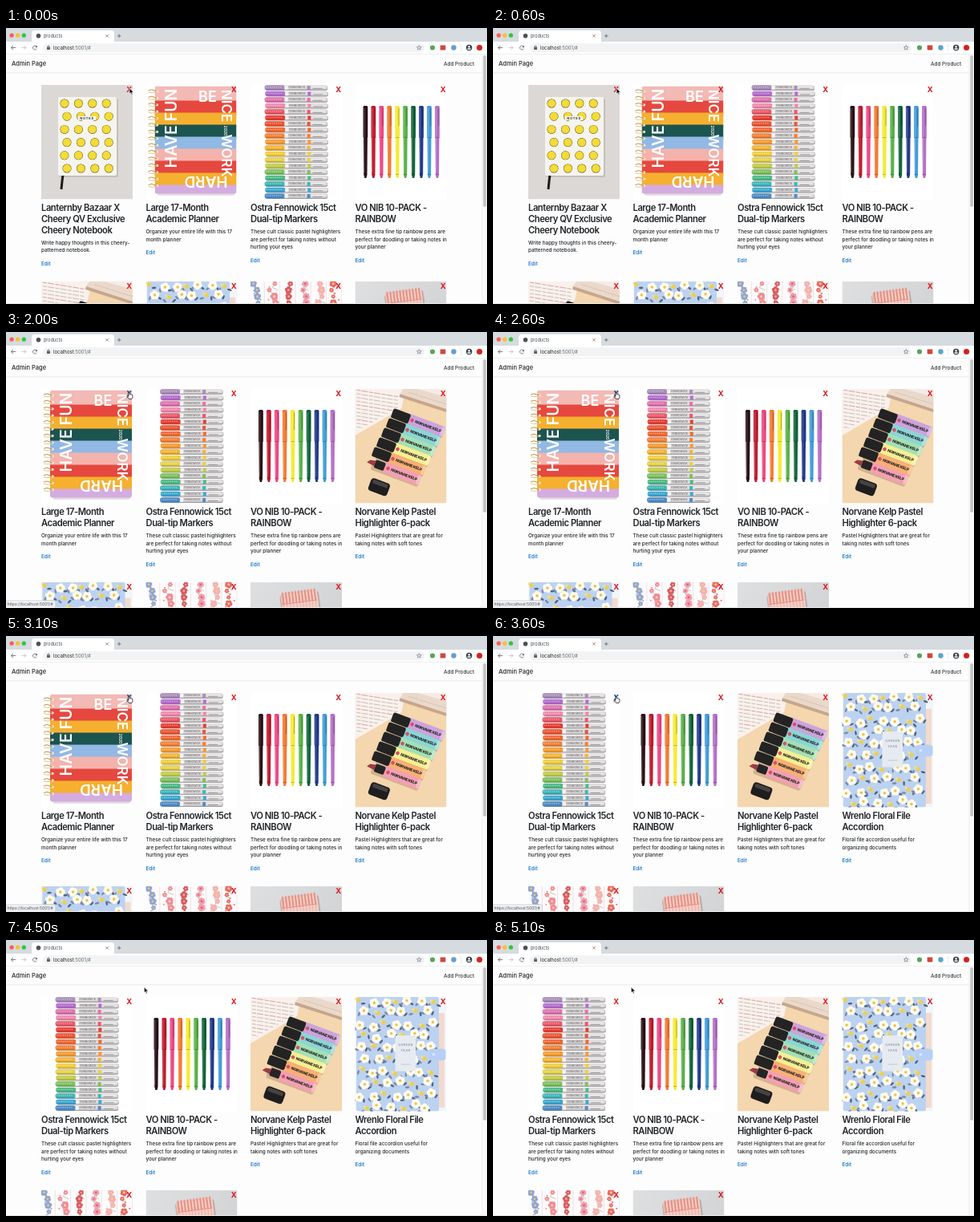
These frames come from a looping animation (600 by 344 pixels, 5.2 s). An HTML page with a canvas:

```html
<!DOCTYPE html>
<html lang="en">
<head>
<meta charset="utf-8">
<title>products</title>
<style>
html, body { margin: 0; width: 100%; height: 100%; overflow: hidden; background: #fff; }
canvas { display: block; width: 600px; height: 344px; }
</style>
</head>
<body>
<canvas id="stage"></canvas>
<script>
const W = 600, H = 344, LOOP = 5200;
const HOVER = 1200, STATUS_ON = 1400, DELETE_1 = 1700, DELETE_2 = 3400;
const LEAVE = 3900, ARRIVE = 4300;
const FONT = 'Inter, "Open Sans", sans-serif';
const stage = document.getElementById('stage');
const dpr = window.devicePixelRatio || 1;
stage.width = W * dpr;
stage.height = H * dpr;
const c = stage.getContext('2d');

function rect(x, y, w, h, fill, r = 0) {
  c.fillStyle = fill;
  c.beginPath();
  c.roundRect(x, y, w, h, r);
  c.fill();
}
function dot(x, y, r, fill) {
  c.fillStyle = fill;
  c.beginPath();
  c.arc(x, y, r, 0, Math.PI * 2);
  c.fill();
}
function line(points, color, width = 1) {
  c.strokeStyle = color;
  c.lineWidth = width;
  c.beginPath();
  points.forEach(([x, y]) => c.lineTo(x, y));
  c.stroke();
}
function arc(x, y, r, from, to, color, width = 0.8) {
  c.strokeStyle = color;
  c.lineWidth = width;
  c.beginPath();
  c.arc(x, y, r, from, to);
  c.stroke();
}
function poly(points, fill, stroke, width = 0.7) {
  c.beginPath();
  points.forEach(([x, y]) => c.lineTo(x, y));
  c.closePath();
  c.fillStyle = fill;
  c.fill();
  if (stroke) {
    c.strokeStyle = stroke;
    c.lineWidth = width;
    c.stroke();
  }
}
function text(s, x, y, size, color, { weight = 400, align = 'left', spacing = 0 } = {}) {
  c.font = `${weight} ${size}px ${FONT}`;
  c.letterSpacing = spacing + 'px';
  c.textAlign = align;
  c.textBaseline = 'alphabetic';
  c.fillStyle = color;
  c.fillText(s, x, y + size * 0.36);
}
function at(x, y, angle, draw) {
  c.save();
  c.translate(x, y);
  c.rotate(angle);
  draw();
  c.restore();
}
function random(seed) {
  return () => (seed = (seed * 16807) % 2147483647) / 2147483647;
}
function flower(x, y, r, petal, heart) {
  for (let k = 0; k < 5; k++) {
    const a = k * Math.PI * 0.4 + x;
    dot(x + Math.cos(a) * r * 0.55, y + Math.sin(a) * r * 0.55, r * 0.52, petal);
  }
  dot(x, y, r * 0.32, heart);
}
function leaf(x, y, angle, color) {
  c.fillStyle = color;
  c.beginPath();
  c.ellipse(x, y, 2.9, 1.3, angle, 0, Math.PI * 2);
  c.fill();
}

// Product pictures, each in a box of 114 by 142.5
function notebook() {
  rect(0, 0, 114, 142.5, '#dcd8d6');
  rect(22, 17, 74, 98, '#c4bfbb', 2);
  line([[27, 112], [26, 120], [25, 130]], '#1d1d1d', 3);
  rect(21, 15, 73, 98, '#f6f4ee', 2);
  for (let row = 0; row < 6; row++) {
    for (let col = 0; col < 4; col++) {
      const x = 29 + col * 17.4 + (row % 2 ? 3 : 0), y = 23 + row * 16.2;
      dot(x, y, 5.5, '#4a4420');
      dot(x, y, 5.1, '#f3dc35');
    }
  }
  rect(46, 39, 22, 5, '#f6f4ee');
  text('NOTES', 57, 41.5, 4, '#333', { weight: 700, align: 'center', spacing: 0.8 });
}

function planner() {
  rect(0, 0, 114, 142.5, '#fff');
  rect(14, 130, 97, 8, '#e2dfdf', 3);
  const stripes = ['#f3b9b5', '#e5483f', '#f5b02f', '#1c5450', '#92b9e4',
    '#f3b3ac', '#e5483f', '#f5b02f', '#d4ace0'];
  c.save();
  c.beginPath();
  c.roundRect(11, 1.5, 102, 134, 3);
  c.clip();
  stripes.forEach((s, i) => rect(11, 1.5 + (i + (i ? 0.2 : 0)) * 15, 102, 18.5, s));
  c.restore();
  for (let y = 8; y < 132; y += 8.4) {
    dot(14, y, 1.6, '#fff4e2');
    line([[3, y - 1], [7, y - 2.2], [14, y]], '#b9923f', 1);
    line([[3, y + 1], [8, y + 1.8], [14, y + 1]], '#d9bc76', 0.8);
  }
  const word = (s, x, y, angle, size) => at(x, y, angle, () =>
    text(s, 0, 0, size, '#fff', { weight: 600, align: 'center' }));
  word('HAVE FUN', 31, 54, -Math.PI / 2, 19.5);
  word('BE', 77, 15, 0, 18);
  word('NICE', 101, 26, Math.PI / 2, 17);
  word('WORK', 101, 88, Math.PI / 2, 17);
  word('HARD', 75, 121, Math.PI, 19);
  word('2020', 99, 57, Math.PI / 2, 5);
}

function markers() {
  rect(0, 0, 114, 142.5, '#fff');
  const inks = ['#a98fbd', '#b56fd0', '#e273b0', '#f08bb0', '#ec5a68', '#e83f35', '#ee5630',
    '#f26a35', '#f58236', '#f49d35', '#f4b535', '#f2cf3e', '#e6d24e', '#c3cc4c',
    '#7cc45c', '#4fbb86', '#43b6b8', '#3fa9d2', '#4f8fc8'];
  inks.forEach((ink, i) => {
    const y = 0.3 + i * 7.5, x = 17.6 + (i % 2) * 0.7;
    rect(x + 1, y + 0.4, 77.5, 6.4, '#a3a0a2', 2.5);
    rect(x + 1, y + 0.5, 77, 4.7, '#dedbdc', 2);
    rect(x, y, 25, 6.2, ink, 2.5);
    line([[x + 2, y + 5.4], [x + 24, y + 5.4]], 'rgba(60,40,60,.28)', 1);
    for (let k = 2; k < 22; k += 2.6) dot(x + k, y + 2.4, 0.65, 'rgba(255,255,255,.5)');
    rect(x + 25, y + 0.8, 4, 4.6, '#f5f3f3');
    text('FENNOWICK', x + 30, y + 2.9, 3.3, '#6f6b6d', { weight: 500 });
    rect(x + 53, y + 0.6, 4, 5, ink);
    line([[x + 58, y + 2.2], [x + 76, y + 2.2]], '#f4f2f2', 1.2);
    line([[x + 60, y + 4], [x + 72, y + 4]], '#8d898b', 0.8);
  });
}

function pens() {
  rect(0, 0, 114, 142.5, '#fff');
  const inks = ['#2a1218', '#c01c30', '#ee4784', '#f47a30', '#f5ea32',
    '#58b147', '#12653b', '#213a8c', '#419cda', '#b56fc6'];
  inks.forEach((ink, i) => {
    const x = 10 + i * 9.95;
    rect(x, 26, 5.8, 40, ink, 1.5);
    poly([[x + 0.4, 65], [x + 5.4, 65], [x + 5, 112], [x + 4, 116], [x + 1.8, 116], [x + 0.8, 112]], ink);
    line([[x + 1.4, 29], [x + 1.4, 109]], 'rgba(255,255,255,.3)', 0.8);
    line([[x + 0.4, 65.5], [x + 5.4, 65.5]], 'rgba(0,0,0,.3)', 0.7);
    line([[x + 4.7, 29], [x + 4.7, 51]], 'rgba(0,0,0,.28)', 1);
    line([[x + 1, 111.5], [x + 4.8, 111.5]], 'rgba(0,0,0,.3)', 0.8);
  });
}

function highlighters() {
  rect(0, 0, 114, 142.5, '#f4d6af');
  poly([[0, 0], [63, 0], [58, 24], [0, 58]], '#f8f1ec');
  for (let i = 0; i < 11; i++) {
    const y = 1 + i * 4.6;
    at(0, y, 0.16, () => {
      c.setLineDash([5, 1.2, 8, 1.5]);
      line([[2, 0], [Math.min(55, 74 - i * 6.5), 0]], i % 4 ? '#cbb9b4' : '#dc9b9d', 0.9);
      c.setLineDash([]);
    });
  }
  poly([[56, 6], [114, 25], [114, 29], [55, 10]], '#c6a68d');
  poly([[60, 0], [114, 0], [114, 25], [56, 6]], '#ead9cb');
  poly([[78, 0], [114, 0], [114, 10]], '#f5ece6');
  line([[66, 4], [114, 19]], '#d3bba9', 0.7);
  const inks = ['#cda3dc', '#8bd5d6', '#a4e0b5', '#f5ef94', '#f7b074', '#f2a0b2'];
  inks.forEach((ink, i) => at(79 - i * 6, 42 + i * 12, 0.36, () => {
    rect(-29, -2, 63, 11, 'rgba(110,70,40,.25)', 3);
    rect(-15, -6.8, 49, 13.6, ink, 3);
    if (i < 5) rect(-35, -6.2, 23, 12.4, '#232323', 2.5);
    else {
      rect(-26, -5.2, 13, 10.4, '#262426', 2);
      poly([[-26, -3.5], [-33, -2], [-36, 2], [-26, 3.5]], '#9c3c45');
    }
    rect(30, -6, 4, 12, 'rgba(255,255,255,.3)', 2);
    dot(-8.5, 0, 2.3, '#d45264');
    text('NORVANE KELP', -4.5, 0, 4.8, '#222', { weight: 800, spacing: -0.25 });
  }));
  at(30, 122, 0.35, () => {
    rect(-12.5, -8, 25, 16.5, '#1e1e1e', 4);
    rect(-10, -6.5, 20, 5, '#444', 2);
  });
}

function binder() {
  const rnd = random(41);
  rect(0, 0, 114, 142.5, '#f2f5f9');
  rect(104, 20, 7.5, 118, '#f2dace', 1);
  rect(1.5, 0, 103, 142.5, '#bcd2f1', 3);
  for (let row = 0; row < 10; row++) {
    for (let col = 0; col < 7; col++) {
      const x = 7 + col * 15 + (row % 2) * 6 + (rnd() - 0.5) * 6;
      const y = 5 + row * 14.6 + (rnd() - 0.5) * 7;
      if (x > 99) continue;
      const turn = rnd() * Math.PI;
      leaf(x + 6, y + 4, turn, '#566480');
      leaf(x - 6, y + 4, turn + 1.5, '#7d8ba6');
      if ((row + col * 2) % 3) flower(x, y, 5.6, '#fdfbf0', '#ecc545');
      else {
        dot(x, y, 2.5, '#f1cf45');
        dot(x - 3.5, y - 2, 1.7, '#f5e07c');
      }
    }
  }
  rect(50, 48, 25.5, 44.5, '#e6ebf1');
  text('GARDEN', 63, 60, 3.8, '#747b87', { align: 'center', spacing: 0.5 });
  text('YEAR', 63, 67, 3.8, '#747b87', { align: 'center', spacing: 0.5 });
  line([[57, 84], [69, 84]], '#aab0bb', 0.6);
  rect(92, 64.5, 21, 14.5, '#b7cff5', 4);
  dot(98, 71.5, 1.8, '#dce7fa');
}

function florals() {
  const rnd = random(97);
  rect(0, 0, 114, 142.5, '#fcfafa');
  const strips = [['#8fa4d6', '#f1cb58'], ['#f08a9c', '#f9d98d'], ['#d95a5f', '#f0b3a4'],
    ['#ef9fae', '#e2606c'], ['#f4b0b4', '#f0d084'], ['#e8696a', '#f7d36a']];
  strips.forEach(([petal, heart], i) => {
    const x = 8 + i * 19.3;
    line([[x + 9.3, 0], [x + 9.3, 142]], '#e4e0df', 0.8);
    for (let y = 3; y < 142; y += 8) {
      const px = x + (rnd() - 0.5) * 9;
      line([[px, y], [x, y + 5], [px + 4, y + 8]], '#a9b59c', 0.7);
      flower(px, y, 2.4 + rnd() * 2.4, petal, heart);
      dot(x + (rnd() - 0.5) * 12, y + 4, 1, petal);
    }
  });
}

function comb() {
  const light = c.createLinearGradient(0, 0, 114, 60);
  light.addColorStop(0, '#dedfe0');
  light.addColorStop(1, '#d2d3d4');
  rect(0, 0, 114, 142.5, light);
  at(61, 22, -0.13, () => {
    rect(-24, -8, 49, 90, '#b7afad', 3);
    rect(-23, -10, 46, 90, '#f2bcb1', 4);
    for (let x = -21; x < 21; x += 4) {
      rect(x, -11.5, 2.3, 14, '#e5968c', 1);
      line([[x + 3, -9], [x + 3, 60]], '#fae1da', 0.9);
    }
    line([[-22, 3], [22, 3]], '#d98078', 0.8);
  });
}

const products = [
  { photo: notebook, title: ['Lanternby Bazaar X', 'Cheery QV Exclusive', 'Cheery Notebook'],
    note: ['Write happy thoughts in this cheery-', 'patterned notebook.'] },
  { photo: planner, title: ['Large 17-Month', 'Academic Planner'],
    note: ['Organize your entire life with this 17', 'month planner'] },
  { photo: markers, title: ['Ostra Fennowick 15ct', 'Dual-tip Markers'],
    note: ['These cult classic pastel highlighters', 'are perfect for taking notes without', 'hurting your eyes'] },
  { photo: pens, title: ['VO NIB 10-PACK -', 'RAINBOW'],
    note: ['These extra fine tip rainbow pens are', 'perfect for doodling or taking notes in', 'your planner'] },
  { photo: highlighters, title: ['Norvane Kelp Pastel', 'Highlighter 6-pack'],
    note: ['Pastel Highlighters that are great for', 'taking notes with soft tones'] },
  { photo: binder, title: ['Wrenlo Floral File', 'Accordion'],
    note: ['Floral file accordion useful for', 'organizing documents'] },
  { photo: florals, title: [], note: [] },
  { photo: comb, title: [], note: [] }
];

const noteOffset = p => 155 + p.title.length * 13.75;
const editOffset = p => noteOffset(p) + p.note.length * 9.8 + 6.8;

function card(p, x, y, hovered) {
  c.save();
  c.translate(x, y);
  c.save();
  c.beginPath();
  c.rect(0, 0, 114, 142.5);
  c.clip();
  p.photo();
  c.restore();
  text('X', 109.7, 5.6, 9.4, hovered ? '#0b4da2' : '#d9151b', { weight: 700, align: 'center' });
  if (hovered) line([[106.3, 10.2], [113, 10.2]], '#0b4da2', 0.8);
  p.title.forEach((s, i) => text(s, 0, 153.4 + i * 13.75, 11.2, '#212529', { weight: 600, spacing: -0.45 }));
  p.note.forEach((s, i) => text(s, 0, noteOffset(p) + i * 9.8, 6.35, '#212529', { weight: 500 }));
  text('Edit', 0, editOffset(p), 6.4, '#0468c8', { weight: 500 });
  c.restore();
}

function page(list, hovering) {
  rect(0, 33, W, H - 33, '#fdfdfd');
  text('Admin Page', 7, 44.3, 7.5, '#212529', { weight: 500 });
  text('Add Product', 546, 44.3, 6.4, '#30343a', { weight: 500 });
  rect(0, 55.4, 594, 0.8, '#dfe1e4');
  const secondRow = 71 + Math.max(...list.slice(0, 4).map(editOffset)) + 22;
  list.forEach((p, i) =>
    card(p, 44 + (i % 4) * 130.5, i < 4 ? 71 : secondRow, hovering && i === 0));
  rect(594, 33, 6, H - 33, '#fafafa');
  rect(593.7, 33, 0.5, H - 33, '#e5e5e5');
  rect(595.3, 34, 3.6, list.length === 8 ? 189 : 191, '#c1c1c1', 1.8);
  rect(0, H - 1, W, 1, '#e4e5e6');
}

function browser() {
  rect(0, 0, W, 17, '#d6dbdf');
  ['#f95f57', '#fcbd2e', '#29c940'].forEach((color, i) => dot(7.1 + i * 7.6, 9.2, 2.6, color));
  rect(32, 3, 103, 15, '#fff', [4, 4, 0, 0]);
  dot(40.5, 9.8, 2.8, '#4b5056');
  text('products', 47, 9.8, 5.5, '#44484d');
  const gray = '#5f6368';
  line([[124.4, 8.1], [127.8, 11.5]], gray, 0.7);
  line([[127.8, 8.1], [124.4, 11.5]], gray, 0.7);
  line([[138.9, 9.8], [143.5, 9.8]], gray, 0.8);
  line([[141.2, 7.5], [141.2, 12.1]], gray, 0.8);

  rect(0, 17, W, 16, '#fff');
  line([[12, 24.5], [6.5, 24.5]], gray, 0.8);
  line([[9, 22], [6.5, 24.5], [9, 27]], gray, 0.8);
  line([[19.5, 24.5], [25, 24.5]], '#b9bcc0', 0.8);
  line([[22.5, 22], [25, 24.5], [22.5, 27]], '#b9bcc0', 0.8);
  arc(36, 24.5, 2.5, 0.5, 5.5, gray);
  poly([[38.8, 21.6], [38.8, 24.3], [36.2, 24.3]], gray);
  rect(46, 19, 476, 11.2, '#f1f3f4', 5.6);
  arc(53, 23.4, 1.3, Math.PI, Math.PI * 2, gray, 0.7);
  rect(51, 23.6, 4, 3.4, gray, 0.5);
  text('localhost', 59, 24.6, 6, '#25282c');
  text(':5001/#', 59 + c.measureText('localhost').width, 24.6, 6, '#6a6e73');
  const star = Array.from({ length: 10 }, (_, k) => {
    const a = -Math.PI / 2 + k * Math.PI / 5, r = k % 2 ? 1.3 : 3;
    return [515.3 + Math.cos(a) * r, 24.6 + Math.sin(a) * r];
  });
  poly(star, '#f1f3f4', gray, 0.6);
  dot(532, 24.5, 3.1, '#57a65b');
  rect(541.7, 21.4, 6.6, 6.2, '#d4443b', 0.8);
  dot(558.5, 24.5, 3.2, '#5f9fcf');
  rect(567.5, 20, 0.6, 9, '#d5d7da');
  dot(577.7, 24.5, 3.7, '#35414c');
  dot(577.7, 23.4, 1.3, '#e9edf0');
  rect(575.5, 25.2, 4.4, 1.8, '#e9edf0', 0.9);
  dot(590.6, 24.5, 3.6, '#d0241f');
  rect(0, 32.4, W, 0.7, '#d9dbde');
}

function arrow(x, y) {
  at(x, y, 0, () => poly([[0, 0], [0, 7], [1.6, 5.6], [2.8, 8.2], [4, 7.6], [2.9, 5.2], [5.1, 5]],
    '#111', '#fff', 0.6));
}
function hand(x, y) {
  at(x, y, 0, () => poly([[-1.6, -4], [-0.4, -4.3], [0.3, -1.3], [1.2, -1.6], [1.8, -0.9],
    [2.7, -1.2], [3.2, -0.4], [3.9, -0.3], [4, 2], [3, 4.4], [-0.6, 4.4], [-3, 1.2], [-2.2, 0.5], [-0.9, 1.4]],
    '#fff', '#111', 0.75));
}

function draw(t) {
  c.setTransform(dpr, 0, 0, dpr, 0, 0);
  const removed = (t >= DELETE_1) + (t >= DELETE_2);
  const hovering = t >= HOVER && t < LEAVE;
  page(products.slice(removed), hovering);
  browser();
  if (t >= STATUS_ON && t < ARRIVE) {
    rect(-2, 334.5, 64, 12, '#c3c6ca', 2);
    rect(-2, 335, 63.5, 12, '#eceef0', 2);
    text('https://localhost:5001/#', 1.5, 339.3, 5.1, '#54585d');
  }
  if (hovering) hand(154, 79);
  else {
    const p = Math.min(1, Math.max(0, (t - LEAVE) / (ARRIVE - LEAVE)));
    const ease = p * (2 - p);
    arrow(154 + 18.3 * ease, 75 - 16.3 * ease);
  }
}

function tick() {
  draw(performance.now() % LOOP);
  requestAnimationFrame(tick);
}
tick();
</script>
</body>
</html>
```
